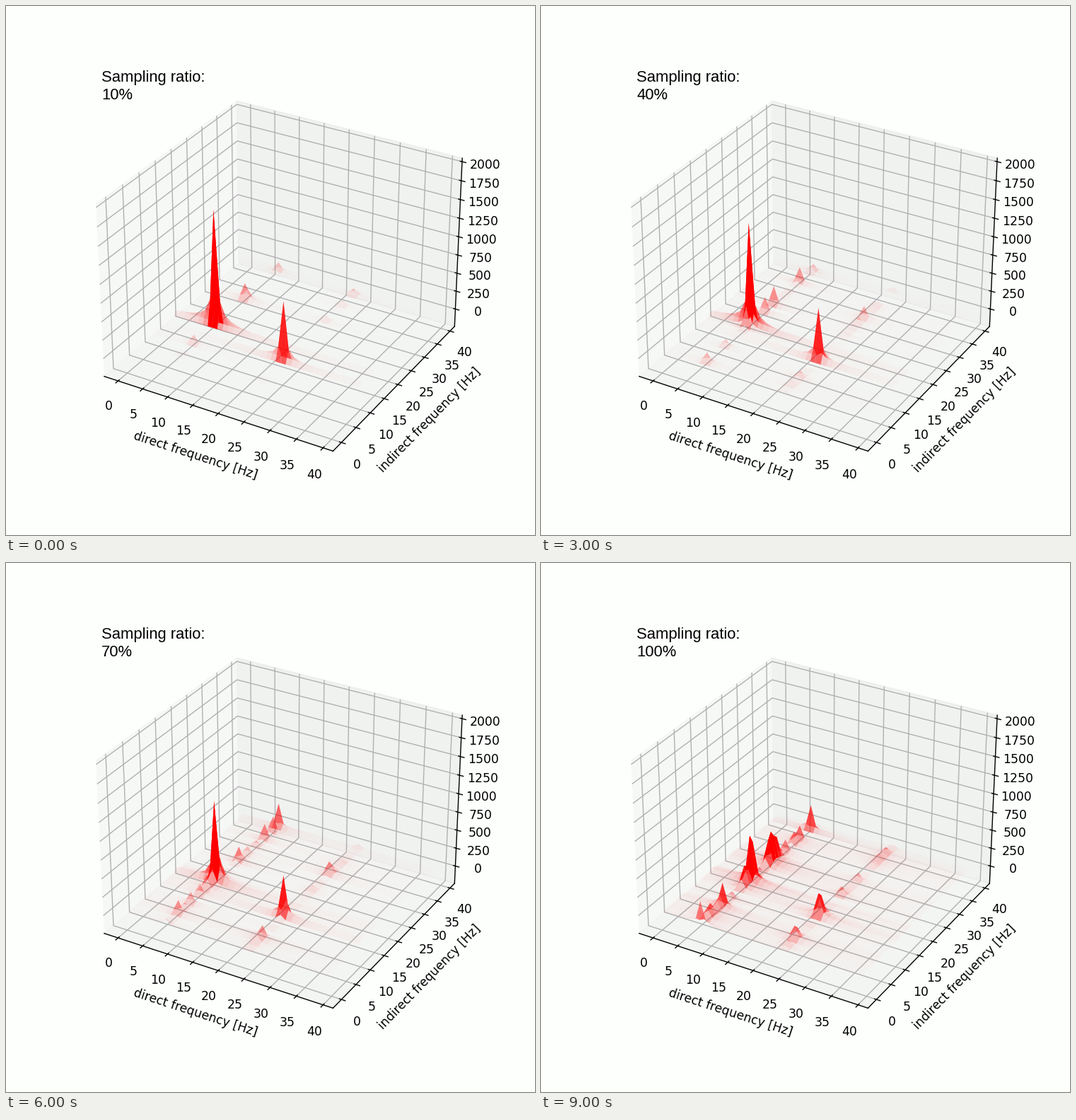
A matplotlib script for the animation above (10000 ms loop, 748 px wide and 748 px high).

```python
import numpy as np
import matplotlib.pyplot as plt
from matplotlib.animation import FuncAnimation
from matplotlib.colors import LinearSegmentedColormap

SIZE, INCHES = 748, 6
DPI = SIZE / INCHES
BACK = "#fcfffc"
N, STEPS = 40, 10
WIDTH = 0.23      # line width along the direct axis
SPACING = 7.5     # usual distance between artefacts on a ridge

freq = np.arange(N)
X, Y = np.meshgrid(freq, freq)
fade = LinearSegmentedColormap.from_list("fade", [(1, 0, 0, 0), (1, 0, 0, 1)])


def main_height(step):
    return np.interp(step, [0, 2, 6, 7, 9], [1568, 1484, 1107, 667, 640])


def line(center):
    return 1 / np.hypot(1, (freq - center) / WIDTH)


def ridge(rng, step, row, main, top):
    """Heights along the indirect axis: one true peak among artefacts."""
    sparse = 20 / (1 + step)
    wave = np.cos(np.pi * (freq - row) / SPACING) ** 2
    heights = top * rng.uniform(size=N) ** sparse * (0.35 + 0.65 * wave)
    heights[row] = main
    # the true peak spreads into its neighbour as the ratio grows
    heights[row + 1] = max(heights[row + 1], 0.8 * main * (step / 9) ** 2)
    return heights


def spectrum(step):
    rng = np.random.default_rng(step)
    main = main_height(step)
    left = ridge(rng, step, 16, main, 480)
    right = ridge(rng, step, 12, 0.51 * main, 220)
    z = np.hypot(np.outer(left, line(8)), np.outer(right, line(24)))
    return z + 0.6 * step * rng.uniform(size=(N, 1))


def padded(low, high):
    pad = (high - low) / 48
    return low - pad, high + pad


fig = plt.figure(figsize=(INCHES, INCHES), dpi=DPI, facecolor=BACK)
ax = fig.add_subplot(projection="3d", facecolor=BACK)
ax.set(xlim=padded(-1.95, 40.95), ylim=padded(-1.95, 40.95),
       zlim=padded(-200, 2000), xticks=range(0, 41, 5),
       yticks=range(0, 41, 5), zticks=range(0, 2001, 250),
       xlabel="direct frequency [Hz]", ylabel="indirect frequency [Hz]")


def caption(text, baseline):
    return fig.text(135 / SIZE, 1 - baseline / SIZE, text, va="baseline",
                    family="Liberation Sans", fontsize=22 * 72 / DPI)


caption("Sampling ratio:", 107)
ratio = caption("", 132)
surfaces = []


def draw(step):
    while surfaces:
        surfaces.pop().remove()
    z = spectrum(step)
    surfaces.append(ax.plot_surface(
        X, Y, z, cmap=fade, vmin=0, vmax=130 + z.max() / 6,
        rstride=1, cstride=1, linewidth=0, antialiased=True))
    ratio.set_text(f"{10 * (step + 1)}%")
    return surfaces + [ratio]


anim = FuncAnimation(fig, draw, frames=STEPS, init_func=lambda: draw(0),
                     interval=1000, repeat=True, repeat_delay=0, blit=False)
plt.show()
```
